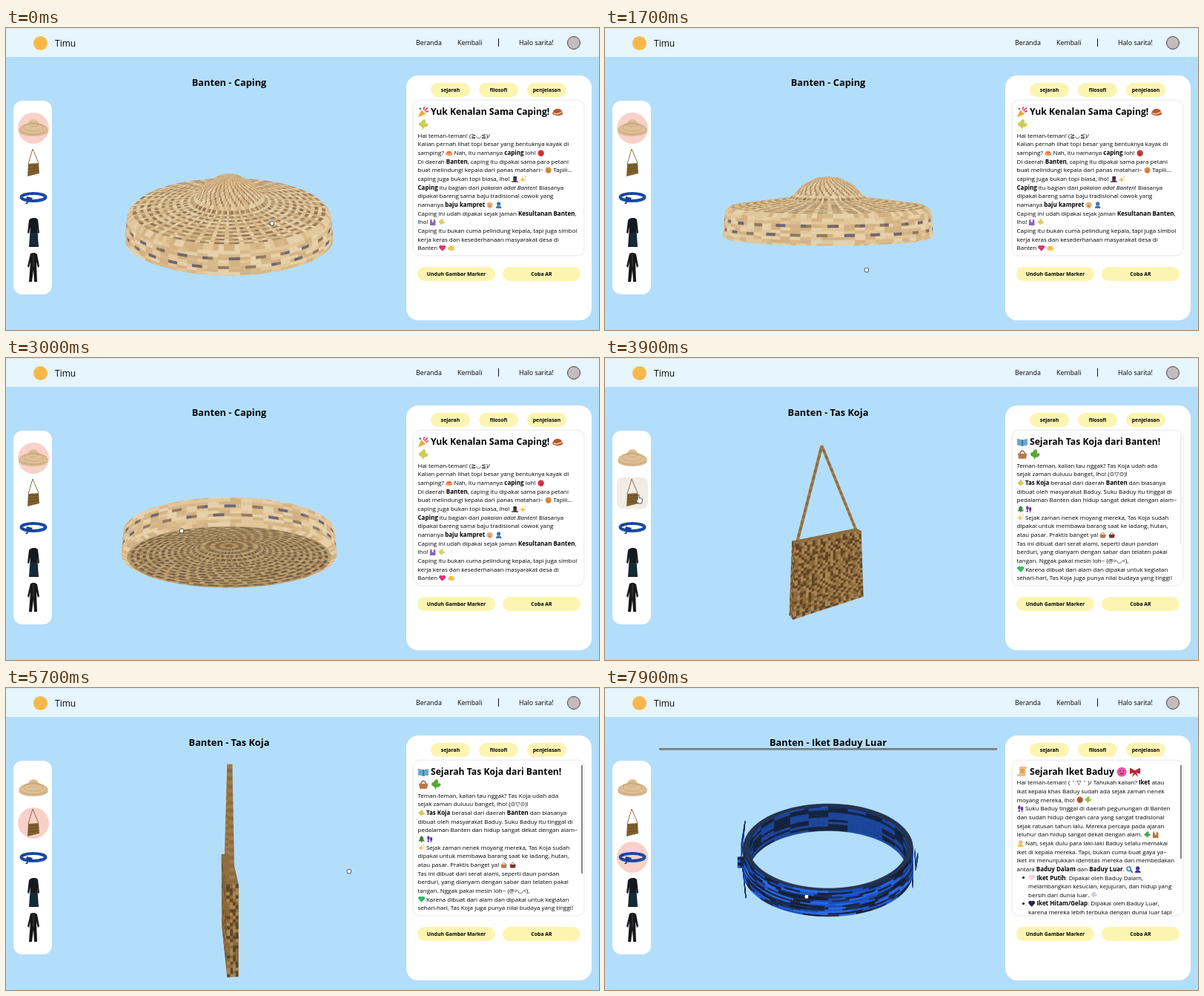
An HTML page with a canvas that plays this animation: 800x407 px, repeating every 8000 ms.

```html
<!DOCTYPE html>
<html lang="id">
<head>
<meta charset="utf-8">
<title>Pakaian adat Banten</title>
<style>
html, body { margin: 0; width: 100%; height: 100%; overflow: hidden; }
#stage { position: relative; width: 800px; height: 407px; overflow: hidden; background: #b3defb;
  color: #000; font-family: "Comic Sans MS", "Open Sans", "DejaVu Sans", sans-serif; }
#stage > *, .thumb, .panel > * { position: absolute; }
header { inset: 0 0 auto; height: 39px; background: #e6f5fe; box-shadow: inset 0 1px #dbe3e8; }
header span { position: absolute; top: 10px; line-height: 20px; font-size: 8.9px; font-weight: 500; white-space: pre; }
header .brand { left: 66px; top: 11px; font-size: 12px; }
.logo, .avatar { position: absolute; border-radius: 50%; }
.logo { left: 37px; top: 11px; width: 19px; height: 19px; background: #f7b84b; }
.avatar { left: 757px; top: 11px; width: 16px; height: 16px; background: #c3bcbd; border: 1px solid #4b4548; }
.bar { position: absolute; left: 664px; top: 14px; width: 1.2px; height: 11px; background: #111; }
#title { left: 73px; width: 456px; top: 63px; line-height: 20px; text-align: center; font-size: 12.8px; font-weight: 700; }
#rule { left: 73px; top: 81px; width: 456px; height: 1px; border-top: 1px solid #6a7378; border-bottom: 1px solid #8d999f; background: #7c868b; }
.side { left: 10px; top: 98px; width: 52px; height: 261px; border-radius: 12px; background: #fff; }
.thumb { left: 6px; width: 42px; height: 42px; border-radius: 8px; }
.thumb.on { background: #f9d1c9; border-radius: 50%; }
.thumb.hover { background: #f1ece6; border-radius: 8px; }
.thumb svg { display: block; }
.panel { left: 540px; top: 64px; width: 250px; height: 330px; border-radius: 16px; background: #fff; }
.btn { height: 19px; border-radius: 10px; background: #fcf5b2; text-align: center;
  font: 700 6.9px/19px "Open Sans", sans-serif; }
.box { left: 9px; top: 33px; width: 231px; height: 210px; box-sizing: border-box; overflow: hidden; border-radius: 10px;
  border: 1px solid #f0f0f0; box-shadow: 0 0 3px #e9e9e9; }
#text { position: absolute; left: 5.5px; top: 5.8px; font-size: 8px; white-space: pre; }
#text div { position: relative; height: 11.67px; line-height: 11.67px; }
#text .h { height: 17.5px; line-height: 17.5px; font-size: 12.2px; font-weight: 700; }
#text .li, #text .in { left: 15.5px; }
#text .li::before { content: ""; position: absolute; left: -8.5px; top: 4.5px; width: 3px; height: 3px; border-radius: 50%; background: #000; }
#text svg { width: 1.17em; height: 1.17em; vertical-align: -.25em; }
#bar { left: 236px; top: 40px; width: 1.6px; background: #858585; }
#cursor { left: 0; top: 0; }
</style>
</head>
<body>
<div id="stage">
  <header>
    <i class="logo"></i><span class="brand">Timu</span>
    <span style="left:553px">Beranda</span><span style="left:609px">Kembali</span><i class="bar"></i>
    <span style="left:692px">Halo sarita!</span><i class="avatar"></i>
  </header>
  <div id="title"></div><div id="rule"></div>
  <canvas id="view" width="800" height="407"></canvas>
  <div class="side">
    <div class="thumb" style="top:16px"><svg width="42" height="42">
      <path d="M1 23Q3 17 14 14Q16 9 21 9Q26 9 28 14Q39 17 41 23Q41 32 21 32Q1 32 1 23Z" fill="#dfc096"/>
      <g fill="none" stroke="#a5825a" stroke-width=".8" stroke-dasharray="1.2 1.5">
        <ellipse cx="21" cy="22" rx="18" ry="7"/><ellipse cx="21" cy="20" rx="13" ry="5"/><ellipse cx="21" cy="16" rx="7" ry="3"/><path d="M2 26Q21 34 40 26"/></g>
    </svg></div>
    <div class="thumb" style="top:63px"><svg width="42" height="42">
      <path d="M14 22L20 2L28 21" fill="none" stroke="#7c6040" stroke-width=".9"/>
      <path d="M14 22L28 21L29 35L13 39Z" fill="#80602f"/>
      <path d="M14 25L28 24M14 29L28 27M14 33L28 31" stroke="#5c431f" stroke-dasharray="1.5 1"/>
    </svg></div>
    <div class="thumb" style="top:109px"><svg width="42" height="42">
      <ellipse cx="21" cy="21" rx="16.5" ry="5" fill="none" stroke="#1c4fae" stroke-width="4"/>
      <path d="M5 22Q21 29 37 21M6 19Q21 13 36 19" fill="none" stroke="#152d62" stroke-dasharray="4 2"/>
      <path d="M12 20L20 22 17 27 11 25ZM15 24L10 30 13 30Z" fill="#173f94"/>
    </svg></div>
    <div class="thumb" style="top:156px"><svg width="42" height="42">
      <path d="M17 3L20 2H24L27 4L29 22L27 23L26 14L28 41H15L17 14L15 23L13 22L15 5Z" fill="#15181d"/>
      <path d="M17 22H26L27 40H16Z" fill="#142b38"/>
    </svg></div>
    <div class="thumb" style="top:203px"><svg width="42" height="42">
      <path d="M17 3L20 2H23L26 4L29 20L27 22L25 14L26 41H22L21 25L19 41H15L17 14L15 22L13 20Z" fill="#17171a"/>
      <path d="M21 3V21" stroke="#55555a" stroke-width=".7"/>
    </svg></div>
  </div>
  <div class="panel">
    <div class="btn" style="left:33px;top:10px;width:53px">sejarah</div>
    <div class="btn" style="left:98px;top:10px;width:53px">filosofi</div>
    <div class="btn" style="left:163px;top:10px;width:53px">penjelasan</div>
    <div class="box"><div id="text"></div></div>
    <i id="bar"></i>
    <div class="btn" style="left:15px;top:258px;width:105px">Unduh Gambar Marker</div>
    <div class="btn" style="left:130px;top:258px;width:105px">Coba AR</div>
  </div>
  <svg id="cursor" width="14" height="16" fill="#fff" stroke="#222" stroke-width=".8">
    <path id="grab" d="M4.5 5Q5.5 4 6.2 4.6Q7 3.8 7.8 4.6Q9 4.2 9.5 5.3V7.5L8.8 10H5.4L4 7.6Z"/>
    <path id="point" d="M4 1.6Q5 .4 6 1.6V5.6Q9 5.4 10.4 7V10L9.2 13H4.8L1.6 8.8Q2.2 7.4 4 8.6Z"/>
  </svg>
</div>
<script>
const $ = id => document.getElementById(id);
const LOOP = 8000, DEG = Math.PI / 180;

// Small pictograms, written in the texts as [shape colour]
const shapes = {
  face: '<circle cx="5" cy="5" r="4.5"/><path d="M3 4h1M6 4h1M3.5 6.6h3" stroke="#532" stroke-width=".9"/>',
  heart: '<path d="M5 9.3L.8 5A2.5 2.5 0 0 1 5 1.9 2.5 2.5 0 0 1 9.2 5Z"/>',
  leaf: '<path d="M4.6 10Q4 7 1 6Q0 3 3 2.6Q3 1 6 0Q8 2 6.6 4Q9 3 9.6 5Q8 8 5.6 7.4Z"/>',
  star: '<path d="M4 1L5.2 4.6 9 6 5.2 7.2 4 10 2.8 7.2 0 6 2.8 4.6ZM8 0L8.5 1.5 10 2 8.5 2.5 8 4 7.5 2.5 6 2 7.5 1.5Z"/>',
  box: '<path d="M.6 4h8.8L8.4 9H1.6Z"/><path d="M2.5 4Q5 -1 7.5 4" fill="none" stroke="#753" stroke-width=".9"/>',
  book: '<path d="M0 2L5 3 10 2V8L5 9 0 8Z"/><path d="M5 3V9" stroke="#357" stroke-width=".8"/>',
  man: '<circle cx="5" cy="3.2" r="2.8"/><path d="M.8 10Q1 6 5 6T9.2 10Z"/>',
  hat: '<path d="M0 8H10V9.4H0ZM2.5 1h5v7h-5Z"/><path d="M2.5 6.6h5" stroke="#b35" stroke-width="1.2"/>',
  cone: '<path d="M0 10L3 3 7 7Z"/><path d="M5 3L6 0M7 5L10 4M6 4L9 1" stroke="#d46" stroke-width="1.2"/><circle cx="2" cy="2" r="1" fill="#47c"/>',
  bow: '<path d="M0 1L5 3.6 10 1V7L6.4 5.6 8 10 5 7 2 10 3.6 5.6 0 7Z"/>',
  cap: '<path d="M0 7Q1 2 5 2T10 7Q5 10 0 7Z"/><path d="M1 6Q5 8 9 5" fill="none" stroke="#fc9" stroke-width="1"/>',
  feet: '<ellipse cx="3" cy="3.4" rx="1.8" ry="3"/><circle cx="3" cy="8" r="1.3"/><ellipse cx="7" cy="4.8" rx="1.8" ry="3"/><circle cx="7" cy="9" r="1"/>',
  tree: '<path d="M5 0L8.5 4H7L9.5 8H.5L3 4H1.5Z"/><path d="M5 8v2" stroke="#753" stroke-width="1.6"/>',
  fort: '<path d="M1 10V3L2.5 0 4 3V5H6V3L7.5 0 9 3V10Z"/>',
  lens: '<circle cx="4" cy="4" r="3" fill="#def" stroke="#37b" stroke-width="1.4"/><path d="M6.5 6.5L9.5 9.5" stroke="#345" stroke-width="1.6"/>',
  roll: '<path d="M2 0H9V2H8V9H1Q0 9 0 7H2Z"/><path d="M3.5 3h3M3.5 5h3" stroke="#a73" stroke-width=".7"/>'
};

const texts = {
hat: `#[cone ea3] Yuk Kenalan Sama Caping! [cap b53]
#[leaf cc5]
Hai teman-teman! (≧◡≦)/
Kalian pernah lihat topi besar yang bentuknya kayak di
samping? [cap e74] Nah, itu namanya <b>caping</b> loh! [face d34]
Di daerah <b>Banten</b>, caping itu dipakai sama para petani
buat melindungi kepala dari panas matahari~ [face d95] Tapiii...
caping juga bukan topi biasa, lho! [hat 334] [star fb5]
<b>Caping</b> itu bagian dari <em>pakaian adat Banten</em>! Biasanya
dipakai bareng sama baju tradisional cowok yang
namanya <b>baju kampret</b> [face eb8] [man 47a]
Caping ini udah dipakai sejak jaman <b>Kesultanan Banten</b>,
lho! [fort 86b] [leaf dc6]
Caping itu bukan cuma pelindung kepala, tapi juga simbol
kerja keras dan kesederhanaan masyarakat desa di
Banten [heart d37] [cap fb3]
Wah keren ya! Tadi kalau lihat caping jangan`,
bag: `#[book 6ac] Sejarah Tas Koja dari Banten!
#[box b74] [leaf 5a3]
Teman-teman, kalian tau nggak? Tas Koja udah ada
sejak zaman duluuu banget, lho! (⊙▽⊙)!
[leaf cc5] <b>Tas Koja</b> berasal dari daerah <b>Banten</b> dan biasanya
dibuat oleh masyarakat Baduy. Suku Baduy itu tinggal di
pedalaman Banten dan hidup sangat dekat dengan alam~
[tree 384] [feet 63a]
[star fb5] Sejak zaman nenek moyang mereka, Tas Koja sudah
dipakai untuk membawa barang saat ke ladang, hutan,
atau pasar. Praktis banget ya! [box b74] [box 733]
Tas ini dibuat dari serat alami, seperti daun pandan
berduri, yang dianyam dengan sabar dan telaten pakai
tangan. Nggak pakai mesin loh~ (@&gt;◡&lt;),
[heart 3b6] Karena dibuat dari alam dan dipakai untuk kegiatan
sehari-hari, Tas Koja juga punya nilai budaya yang tinggi!
Sekarang tas ini sering dijumpai di mana-mana`,
band: `#[roll eb7] Sejarah Iket Baduy [face e5a] [bow b23]
Hai teman-teman! ( ˆ ▽ ˆ )/ Tahukah kalian? <b>Iket</b> atau
ikat kepala khas Baduy sudah ada sejak zaman nenek
moyang mereka, lho! [face b63] [leaf 9b4]
[feet 63a] Suku Baduy tinggal di daerah pegunungan di Banten
dan sudah hidup dengan cara yang sangat tradisional
sejak ratusan tahun lalu. Mereka percaya pada ajaran
leluhur dan hidup sangat dekat dengan alam. [leaf 4a5] [fort b73]
[man eb6] Nah, sejak dulu para laki-laki Baduy selalu memakai
iket di kepala mereka. Tapi, bukan cuma buat gaya ya~
Iket ini menunjukkan identitas mereka dan membedakan
antara <b>Baduy Dalam</b> dan <b>Baduy Luar</b>. [lens 37b] [man 43a]
*[heart fcd] <b>Iket Putih</b>: Dipakai oleh Baduy Dalam,
+melambangkan kesucian, kejujuran, dan hidup yang
+bersih dari dunia luar. [leaf ccd]
*[heart 224] <b>Iket Hitam/Gelap</b>: Dipakai oleh Baduy Luar,
+karena mereka lebih terbuka dengan dunia luar tapi`
};

const lineClass = { '#': 'h', '*': 'li', '+': 'in' };
const toHtml = text => text.split('\n').map(line => {
  const cls = lineClass[line[0]] || '';
  const body = (cls ? line.slice(1) : line).replace(/\[(\w+) (\w+)\]/g,
    (_, shape, color) => `<svg viewBox="0 0 10 10" fill="#${color}">${shapes[shape]}</svg>`);
  return `<div class="${cls}">${body}</div>`;
}).join('');

// Mesh building: points are [x, height, z], faces are {pts, color}
const rnd = (i, j) => { const v = Math.sin(i * 127.1 + j * 311.7) * 43758.5; return v - Math.floor(v); };
const mix = (a, b, u) => a.map((v, n) => v + (b[n] - v) * u);

function patch(a, b, c, d, cols, rows, color) {
  const at = (i, j) => mix(mix(a, b, i / cols), mix(d, c, i / cols), j / rows);
  const faces = [];
  for (let j = 0; j < rows; j++) for (let i = 0; i < cols; i++)
    faces.push({ pts: [at(i, j), at(i + 1, j), at(i + 1, j + 1), at(i, j + 1)], color: color(i, j) });
  return faces;
}

function lathe([r0, h0], [r1, h1], rows, segs, color) {
  const at = (i, j) => {
    const a = j / segs * 2 * Math.PI, r = r0 + (r1 - r0) * i / rows;
    return [r * Math.cos(a), h0 + (h1 - h0) * i / rows, r * Math.sin(a)];
  };
  const faces = [];
  for (let i = 0; i < rows; i++) for (let j = 0; j < segs; j++)
    faces.push({ pts: [at(i, j), at(i, j + 1), at(i + 1, j + 1), at(i + 1, j)], color: color(i, j) });
  return faces;
}

const pick = (list, v) => list[Math.floor(v * list.length)];
const straw = (i, j) => pick(['#e3c699', '#d9b988', '#e8d0a8', '#d3b182'], rnd(i, j));
const slope = (i, j) => i % 2 && j % 3 ? pick(['#a5855d', '#b8966a', '#937250'], rnd(i, j)) : straw(i, j);
const crown = (i, j) => (i + j) % 4 ? straw(i, j) : pick(['#94714c', '#ab8760'], rnd(i, j));
const edge = (i, j) => (i === 2 || i === 5) && (j + i) % 5 < 2 ? pick(['#75635f', '#94785c', '#6d6675'], rnd(i, j)) : straw(i, j >> 1);
const inside = (i, j) => i % 2 && (j + (i >> 1)) % 3 ? pick(['#6b543c', '#7d6446'], rnd(i, j)) : pick(['#b69463', '#a58354', '#c0a072'], rnd(i, j));
const SEGS = 120;
const hatMesh = [
  [[0, 55], [16, 53], 2, crown], [[16, 53], [35, 40], 4, crown], [[35, 40], [44, 27], 4, crown], [[44, 27], [52, 19], 2, slope],
  [[52, 19], [130, 5], 16, slope], [[130, 5], [137, -2], 1, straw], [[137, -2], [140, -35], 8, edge],
  [[140, -35], [133, -38], 1, straw], [[133, -38], [52, -30], 20, inside], [[52, -30], [38, -24], 4, inside], [[38, -24], [0, -22], 6, inside]
].flatMap(([a, b, rows, color]) => lathe(a, b, rows, SEGS, color));

const weave = (i, j) => {
  const slant = (j >> 1) % 2 ? i + j : i - j + 60;
  return ['#5f4526', '#8c6a3c', '#a98553'][(slant + (rnd(i, j) > .8)) % 3];
};
const rope = (i, j) => j % 2 ? '#8e6a3d' : '#a17b4a';
const strap = x => [
  ...patch([-10.5, 114, 0], [-7, 114, 0], [x + 2, -4, 0], [x - 2, -4, 0], 1, 30, rope),
  ...patch([-9, 114, -2.5], [-9, 114, 2.5], [x, -4, 2.5], [x, -4, -2.5], 1, 30, rope)
];
const corner = (sx, top, z) => [sx * (top ? 50 : 59), top ? -4 : -113, z];
const bagMesh = [
  ...[6, -6].flatMap(z => patch(corner(-1, 1, z), corner(1, 1, z), corner(1, 0, z), corner(-1, 0, z), 26, 28, weave)),
  ...[-1, 1].flatMap(s => patch(corner(s, 1, -6), corner(s, 1, 6), corner(s, 0, 6), corner(s, 0, -6), 4, 28, weave)),
  ...patch(corner(-1, 1, -6), corner(1, 1, -6), corner(1, 1, 6), corner(-1, 1, 6), 26, 2, () => '#8f6f42'),
  ...strap(-46), ...strap(46)
];

const BLUES = ['#1e5bd0', '#2a6ae6', '#1b4fb8'], DARKS = ['#17264a', '#1f2f55', '#141d36'];
const batik = (i, j) => rnd(i, j) > .52 ? pick(BLUES, rnd(j, i)) : pick(DARKS, rnd(j, i));
const streak = (i, j) => batik(i, Math.floor((j + rnd(i, 3) * 9) / 5));
const shaded = (i, j) => rnd(i, j >> 2) > .5 ? '#1d479b' : '#16233f';
const tri = (x0, x1, apex, h0, h1, z0, z1) =>
  patch([x0, h0, z0], [x1, h0, z0], [apex + 1, h1, z1], [apex - 1, h1, z1], 9, 13, batik);
const bandMesh = [
  ...lathe([114, 20], [114, -20], 14, 150, streak),
  ...lathe([107, 18], [107, -18], 10, 100, shaded),
  ...lathe([107, 20], [114, 20], 1, 100, () => '#24344f'),
  ...tri(-28, 20, -5, 16, 64, -117, -112),
  ...tri(-10, 10, -12, 0, -52, -116, -111),
  ...patch([-5, 8, -122], [-5, 8, -110], [-5, -9, -110], [-5, -9, -122], 3, 4, batik),
  ...tri(-43, 37, -4, -19, -77, 114, 114),
  ...patch([-14, 17, 117], [2, 17, 117], [56, -101, 121], [43, -107, 121], 4, 26, batik)
];

// Keys: [time, yaw, pitch, vertical shift, zoom, bend]
const scenes = [
  { name: 'hat', title: 'Banten - Caping', start: 0, mesh: hatMesh, cy: 242.6, lift: 10, dist: 1e5, solid: true,
    bend: (h, z, b) => h > 0 ? h * b : h,
    keys: [[0, 0, 20, 0, 1, 1], [1000, -130, 16, 0, 1, 1], [1300, -130, 16, 0, 1, 1], [2300, -60, -17.5, -22, 1.035, .4], [3500, -40, -17.5, -22, 1.035, .4]] },
  { name: 'bag', title: 'Banten - Tas Koja', start: 3500, mesh: bagMesh, cy: 236, lift: 0, dist: 420, bar: 146,
    bend: h => h,
    keys: [[3500, 30, 20, 0, 1, 1], [4600, 30, 20, 0, 1, 1], [5700, 94, 20, 2, 1.15, 1], [6700, 94, 20, 2, 1.15, 1]] },
  { name: 'band', title: 'Banten - Iket Baduy Luar', start: 6700, mesh: bandMesh, cy: 232, lift: 0, dist: 1e5, bar: 126,
    bend: (h, z, b) => h < -18 && z > 113.5 ? -18 + (h + 18) * b : h,
    keys: [[6700, 0, 13, 0, 1, 1], [7250, 0, 13, 0, 1, 1], [7900, 90, 31, 0, 1, .05], [8000, 90, 31, 0, 1, .05]] }
];
const path = [[0, 358, 263], [1000, 130, 182], [1300, 130, 182], [1600, 352, 330], [2300, 352, 259], [2750, 352, 259],
  [3350, 46, 190], [4150, 46, 190], [4600, 290, 235], [5700, 462, 247], [6050, 462, 247], [6600, 32, 245],
  [7150, 32, 245], [7350, 180, 262], [7900, 271, 281], [8000, 271, 281]];

function sample(keys, t) {
  const n = Math.max(1, keys.findIndex(k => k[0] > t));
  const a = keys[n - 1], b = keys[n];
  const u = Math.min(1, (t - a[0]) / (b[0] - a[0]));
  return mix(a, b, u * u * (3 - 2 * u)).slice(1);
}

const ctx = $('view').getContext('2d');
ctx.lineWidth = .5;
ctx.lineJoin = 'round';

function drawModel(scene, t) {
  const [yaw, pitch, dy, zoom, bend] = sample(scene.keys, t);
  const cy = Math.cos(yaw * DEG), sy = Math.sin(yaw * DEG), cp = Math.cos(pitch * DEG), sp = Math.sin(pitch * DEG);
  const project = ([x, h0, z]) => {
    const h = scene.bend(h0, z, bend) - scene.lift;
    const z1 = z * cy - x * sy, depth = z1 * cp + h * sp;
    const s = zoom * scene.dist / (scene.dist - depth);
    return [301 + (x * cy + z * sy) * s, scene.cy + dy + (z1 * sp - h * cp) * s, depth];
  };
  const faces = [];
  for (const { pts, color } of scene.mesh) {
    const [a, b, c, d] = pts.map(project);
    const area = (c[0] - a[0]) * (d[1] - b[1]) - (d[0] - b[0]) * (c[1] - a[1]);
    if (!scene.solid || area < 0) faces.push({ q: [a, b, c, d], color, depth: a[2] + b[2] + c[2] + d[2] });
  }
  faces.sort((f, g) => f.depth - g.depth);
  ctx.clearRect(0, 0, 800, 407);
  for (const { q, color } of faces) {
    ctx.beginPath();
    q.forEach(p => ctx.lineTo(p[0], p[1]));
    ctx.closePath();
    ctx.fillStyle = ctx.strokeStyle = color;
    ctx.fill();
    ctx.stroke();
  }
}

const thumbs = [...document.querySelectorAll('.thumb')];
let shown;

function showScene(scene) {
  shown = scene;
  $('title').textContent = scene.title;
  $('text').innerHTML = toHtml(texts[scene.name]);
  $('rule').hidden = scene.name !== 'band';
  $('rule').style.display = scene.name === 'band' ? '' : 'none';
  $('bar').style.height = (scene.bar || 0) + 'px';
}

function frame(now) {
  const t = now % LOOP;
  const scene = scenes.filter(s => s.start <= t).pop();
  if (scene !== shown) showScene(scene);
  drawModel(scene, t);

  const [x, y] = sample(path, t);
  const onSide = x > 16 && x < 58;
  thumbs.forEach((thumb, i) => {
    const top = 114 + i * 46.7;
    const hover = onSide && y > top && y < top + 42;
    thumb.className = 'thumb' + (hover ? ' hover' : scenes[i] === scene ? ' on' : '');
  });
  $('bar').style.opacity = t < 4400 ? .15 : 1;
  $('cursor').style.transform = `translate(${x - 6}px, ${y - 7}px)`;
  $('grab').style.display = onSide ? 'none' : '';
  $('point').style.display = onSide ? '' : 'none';
  requestAnimationFrame(frame);
}
frame(0);
</script>
</body>
</html>
```
